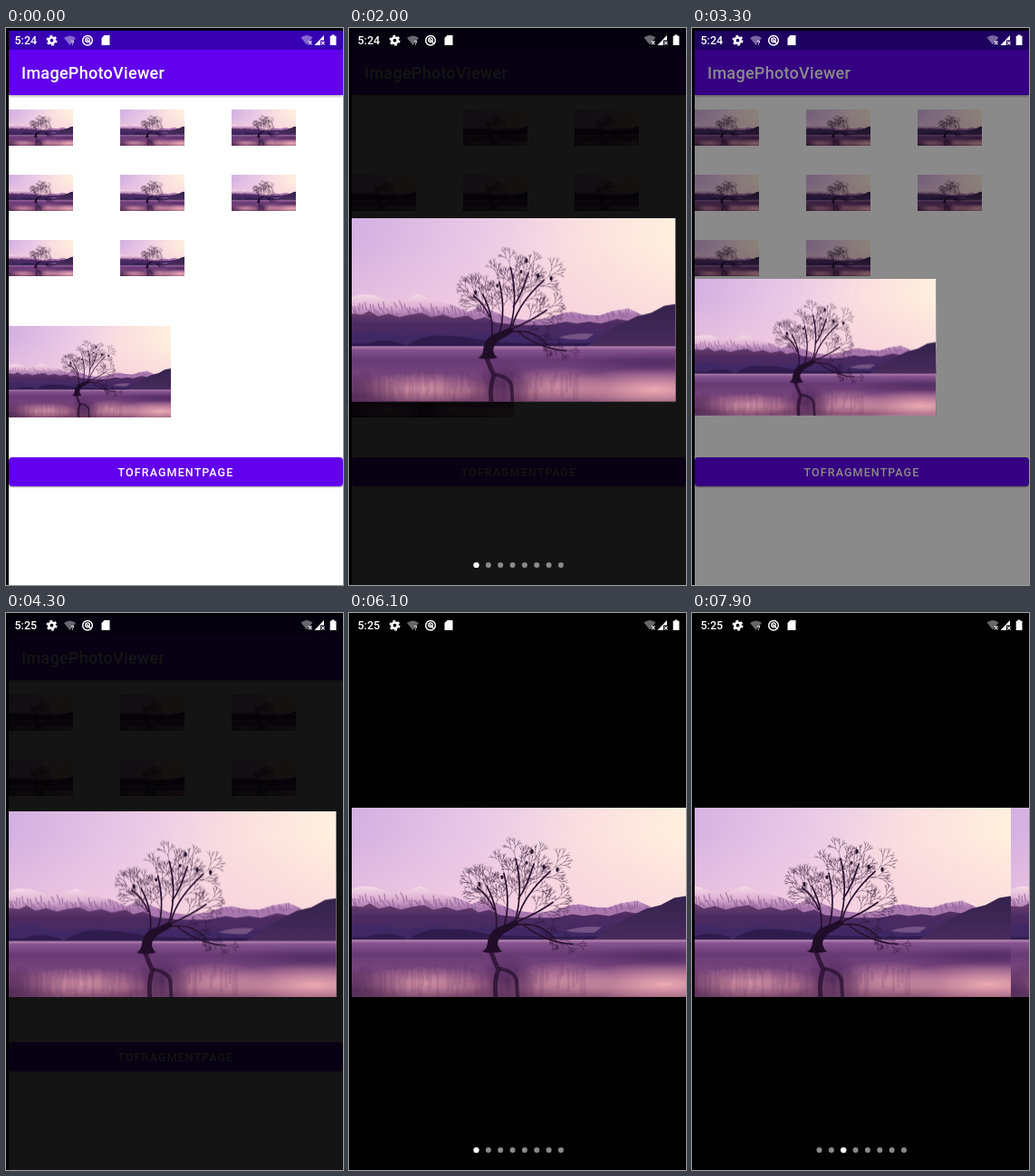
These frames come from a looping animation (372x615 px, 8 s). An HTML page:

```html
<!DOCTYPE html>
<html lang="en">
<head>
<meta charset="utf-8">
<title>Photo viewer</title>
<style>
@property --p { syntax: "<number>"; inherits: true; initial-value: 0; }
@property --dim { syntax: "<number>"; inherits: true; initial-value: 0; }
@property --big { syntax: "<number>"; inherits: true; initial-value: 0; }

html, body { margin: 0; width: 100%; height: 100%; overflow: hidden; background: #000; }
#stage {
  position: relative; width: 372px; height: 615px; overflow: hidden;
  font-family: Roboto, sans-serif; color: #fff;
  animation: open 8s step-end infinite, origin 8s step-end infinite;
}
#stage div, #stage svg { position: absolute; }
#app { left: 3px; top: 3px; right: 0; bottom: 0; background: #fff; overflow: hidden; }
#bar { left: 0; right: 0; top: 0; height: 21px; background: #3700b3; }
#title {
  left: 0; right: 0; top: 21px; height: 50px; padding-left: 14px; box-sizing: border-box;
  background: #6200ee; box-shadow: 0 1px 3px rgba(0,0,0,.4); clip-path: inset(0 0 -6px);
  font: 500 18px/51px Roboto, sans-serif; letter-spacing: .3px;
}
#button {
  left: 0; right: 0; top: 471px; height: 32px; border-radius: 4px;
  background: #6200ee; box-shadow: 0 1px 2px rgba(0,0,0,.4);
  font: 500 12.5px/33px Roboto, sans-serif; letter-spacing: 1.1px; text-align: center;
}
.thumb { width: 71px; height: 40px; }
.thumb.first { opacity: calc(1 - 1000 * var(--p) * (1 - var(--big))); }
#large { left: 0; top: 326px; width: 179px; height: 101px; opacity: calc(1 - 1000 * var(--p) * var(--big)); }
#dim { inset: 0; background: #000; opacity: var(--dim); }
#viewer {
  left: 3px; top: 215px; width: 369px; height: 209px; overflow: hidden;
  transform-origin: 0 0; opacity: calc(1000 * var(--p));
  transform:
    translateY(calc((1 - var(--p)) * (239px * var(--big) - 125px)))
    scale(calc(1 - (1 - var(--p)) * (.807 - .292 * var(--big))));
}
#pages { left: 0; top: 0; width: 738px; height: 209px; animation: swipe 8s step-end infinite; }
#pages svg { width: 369px; height: 209px; top: 0; }
#pages svg + svg { left: 369px; }
#dots { left: 0; top: 0; animation: dots 8s step-end infinite; }
#active { animation: active 8s step-end infinite; }
#status { left: 0; top: 0; }
#status text { font: 500 12.5px Roboto, sans-serif; }
#before { animation: before 8s step-end infinite; }
#after { animation: after 8s step-end infinite; }

@keyframes open {
  0% { --p: 0; --dim: 0; }
  6.25%, 40%, 72.5% { --p: .054; --dim: .054; }
  7.5%, 41.25%, 73.75% { --p: .46; --dim: .46; }
  8.75%, 42.5%, 75% { --p: .92; --dim: .92; }
  10%, 43.75%, 76.25%, 100% { --p: 1; --dim: 1; }
  25%, 53.75% { --p: .962; --dim: .92; }
  26.25%, 55% { --p: .62; --dim: .6; }
  27.5%, 56.25% { --p: .2; --dim: .2; }
  28.75%, 57.5% { --p: .01; --dim: .01; }
  30%, 58.75% { --p: 0; --dim: 0; }
}
@keyframes origin { 0%, 60%, 100% { --big: 0; } 35% { --big: 1; } }
@keyframes swipe {
  0%, 85%, 90% { transform: none; }
  81.25% { transform: translateX(-45px); }
  82.5% { transform: translateX(-215px); }
  83.75% { transform: translateX(-345px); }
  87.5% { transform: translateX(-110px); }
  88.75% { transform: translateX(-330px); }
  95% { transform: translateX(-4px); }
  96.25% { transform: translateX(-9px); }
  97.5% { transform: translateX(-15px); }
  98.75%, 100% { transform: translateX(-20px); }
}
@keyframes dots { 0%, 26.25% { opacity: 0; } 10%, 76.25%, 100% { opacity: 1; } }
@keyframes active {
  0% { transform: none; }
  82.5% { transform: translateX(13.35px); }
  88.75%, 100% { transform: translateX(26.7px); }
}
@keyframes before { 0% { opacity: 1; } 53.75%, 100% { opacity: 0; } }
@keyframes after { 0% { opacity: 0; } 53.75%, 100% { opacity: 1; } }
</style>
</head>
<body>
<svg width="0" height="0" style="position:absolute">
  <defs>
    <linearGradient id="sky" x2="1" y2=".12">
      <stop offset="0" stop-color="#d3b0e1"/><stop offset=".4" stop-color="#e9c9e6"/>
      <stop offset=".7" stop-color="#fae0e0"/><stop offset="1" stop-color="#fff0de"/>
    </linearGradient>
    <linearGradient id="glow" x2="0" y2="1">
      <stop offset=".2" stop-color="#f8cbdd" stop-opacity="0"/><stop offset=".8" stop-color="#f8cbdd" stop-opacity=".6"/>
    </linearGradient>
    <linearGradient id="snow" x2="0" y2="1">
      <stop offset="0" stop-color="#f6dbe8"/><stop offset=".22" stop-color="#dfb3d3"/><stop offset=".4" stop-color="#a977ae"/>
    </linearGradient>
    <linearGradient id="range" x2="0" y2="1">
      <stop offset="0" stop-color="#6b406f"/><stop offset=".35" stop-color="#4c2b61"/><stop offset="1" stop-color="#422864"/>
    </linearGradient>
    <linearGradient id="hill" x2="0" y2="1">
      <stop offset="0" stop-color="#34234c"/><stop offset="1" stop-color="#482b5c"/>
    </linearGradient>
    <linearGradient id="lake" x2="0" y2="1">
      <stop offset="0" stop-color="#bd8bb6"/><stop offset=".06" stop-color="#85548f"/>
      <stop offset=".25" stop-color="#683a74"/><stop offset=".5" stop-color="#76447c"/>
      <stop offset=".8" stop-color="#96597f"/><stop offset="1" stop-color="#764369"/>
    </linearGradient>
    <radialGradient id="pink">
      <stop offset="0" stop-color="#f0adb6" stop-opacity=".95"/><stop offset="1" stop-color="#f0adb6" stop-opacity="0"/>
    </radialGradient>
    <radialGradient id="shade">
      <stop offset="0" stop-color="#35184a" stop-opacity=".8"/><stop offset="1" stop-color="#35184a" stop-opacity="0"/>
    </radialGradient>
    <path id="ridge" d="M0 89L12 86 25 87 36 91 46 94 60 92 75 86 86 90 104 96 118 99 132 106 146 100 158 104 180 113 205 116 225 113 240 107 252 106 265 109 282 110 297 105 315 102 330 109V146H0Z"/>
    <clipPath id="slopes"><use href="#ridge"/></clipPath>
    <symbol id="photo" viewBox="0 0 369 208" preserveAspectRatio="none">
      <rect width="369" height="208" fill="url(#sky)"/>
      <rect width="369" height="146" fill="url(#glow)"/>
      <use href="#ridge" fill="url(#snow)"/>
      <path id="gullies" clip-path="url(#slopes)" fill="none" stroke="#81558f" stroke-width="1.3" opacity=".6"/>
      <path fill="url(#range)" d="M0 108L12 109 20 105 30 111 42 108 54 112 66 109 80 107 90 112 104 109 116 113 132 110 140 115 152 112 164 118 190 121 225 121 244 117 256 119 270 117 284 119 302 114 314 116 330 117V146H0Z"/>
      <path fill="#3f2863" d="M0 131L24 128 54 134 92 131 130 134 160 130 204 134 270 136 300 130V146H0Z"/>
      <path fill="#e0b2cc" opacity=".3" d="M236 135Q255 129 276 131L268 137Q248 138 236 135Z"/>
      <path fill="#2f1c4d" d="M62 145Q76 134 96 133L124 134 160 140 220 142 285 141V146H62ZM0 142L18 142Q38 134 60 143V146H0Z"/>
      <path fill="url(#hill)" d="M267 145Q284 134 302 122L325 111 341 107 356 99 369 97V146H267Z"/>
      <rect y="145" width="369" height="63" fill="url(#lake)"/>
      <ellipse cx="80" cy="192" rx="75" ry="18" fill="url(#pink)" opacity=".7"/>
      <ellipse cx="232" cy="190" rx="60" ry="22" fill="url(#pink)" opacity=".65"/>
      <ellipse cx="345" cy="194" rx="115" ry="25" fill="url(#pink)"/>
      <ellipse cx="345" cy="164" rx="100" ry="13" fill="url(#shade)" opacity=".5"/>
      <ellipse cx="0" cy="200" rx="60" ry="26" fill="url(#shade)" opacity=".8"/>
      <ellipse cx="172" cy="190" rx="34" ry="30" fill="url(#shade)" opacity=".8"/>
      <path id="streaks" stroke="#4a2459" stroke-width="3" opacity=".13"/>
      <g fill="none" stroke="#28102f" stroke-linecap="round">
        <path stroke-width="5" opacity=".8" d="M154 159Q158 170 162 178Q157 190 159 207"/>
        <path stroke-width="4" opacity=".75" d="M164 177Q180 180 182 190L183 207"/>
        <path id="limbs" stroke-width="1.7"/>
        <path id="twigs" stroke-width=".45" opacity=".7"/>
      </g>
      <path fill="#200d28" d="M144 158Q150 155 150 147Q152 137 160 132Q172 128 181 123L185 128Q176 134 168 138Q161 144 161 150Q163 156 166 158Q154 161 144 158Z"/>
      <path stroke="#200d28" stroke-width="3" stroke-linecap="round" d="M199 47v2M212 64v2M227 67v2M193 60v1M166 76v1M141 83v2"/>
    </symbol>
  </defs>
</svg>

<div id="stage">
  <div id="app">
    <div id="title">ImagePhotoViewer</div>
    <div id="bar"></div>
    <div id="grid"></div>
    <svg id="large"><use href="#photo" width="179" height="101"/></svg>
    <div id="button">TOFRAGMENTPAGE</div>
  </div>
  <div id="dim"></div>
  <div id="viewer">
    <div id="pages">
      <svg><use href="#photo" width="369" height="209"/></svg>
      <svg><use href="#photo" width="369" height="209"/></svg>
    </div>
  </div>
  <svg id="dots" width="372" height="615">
    <g id="row" fill="#8a8a8a"></g>
    <circle id="active" cx="140.5" cy="593" r="3.1" fill="#fff"/>
  </svg>
  <svg id="status" width="372" height="28" fill="#fff">
    <text x="9.5" y="18.3" id="before">5:24</text>
    <text x="9.5" y="18.3" id="after">5:25</text>
    <g fill="none" stroke="#fff">
      <circle cx="50.5" cy="13.7" r="3.2" stroke-width="2.6"/>
      <circle cx="50.5" cy="13.7" r="5" stroke-width="2" stroke-dasharray="2.6 2.636"/>
      <circle cx="90" cy="13.7" r="5.3" stroke-width="1.5"/>
      <circle cx="90" cy="13.2" r="2.3" stroke-width="1.3"/>
      <path stroke-width="1.4" d="M89 12.5L94 17.5"/>
    </g>
    <path opacity=".4" d="M64 11Q70.5 6 77 11L70.5 19ZM325.5 10.5Q332 5.500 338.500 10.500L332 18.500Z"/>
    <text x="71.5" y="19" style="font-size:8px">?</text>
    <path d="M108.500 8H114.500V19H105.500V11Z"/>
    <path d="M340.500 19L351 8V13.500H347V19Z"/>
    <path stroke="#fff" stroke-width="1.2" d="M334 14.500l3.500 3.500m0-3.500l-3.500 3.500M348 14.800l3.500 3.500m0-3.500l-3.500 3.500"/>
    <path d="M359.500 7.500H362.500V8.700H364.500V19H357.700V8.700H359.500Z"/>
  </svg>
</div>

<script>
const $ = id => document.getElementById(id);
const times = (n, make) => Array.from({ length: n }, (_, i) => make(i)).join("");
const draw = (id, d) => $(id).setAttribute("d", d);

let seed = 11;
const rand = () => (seed = seed * 16807 % 2147483647) / 2147483647;
const fix = v => v.toFixed(1);

// Tree: main limbs as quadratic curves, each with seeded sprays of twigs.
const limbs = [
  [159, 136, 163, 112, 149, 86],
  [157, 112, 152, 98, 139, 88],
  [168, 131, 176, 105, 168, 72],
  [180, 126, 190, 92, 181, 56],
  [184, 100, 193, 88, 201, 62],
  [183, 122, 190, 96, 219, 70],
  [183, 125, 205, 116, 222, 104],
  [178, 129, 206, 124, 222, 142],
  [190, 129, 214, 148, 244, 150]
];
let twigs = "";

function grow(x, y, angle, len, depth) {
  const x2 = x + Math.cos(angle) * len, y2 = y + Math.sin(angle) * len;
  twigs += `M${fix(x)} ${fix(y)}L${fix(x2)} ${fix(y2)}`;
  if (!depth) return;
  for (const side of [-1, 1])
    grow(x2, y2, angle + side * (.1 + rand() * .45), len * (.65 + rand() * .3), depth - 1);
}

const mix = (a, b, c, t) => (1 - t) ** 2 * a + 2 * t * (1 - t) * b + t * t * c;
for (const [x0, y0, x1, y1, x2, y2] of limbs) {
  const low = y2 > 140;
  [.4, .55, .7, .85, 1].forEach((t, i) => {
    const dx = (1 - t) * (x1 - x0) + t * (x2 - x1), dy = (1 - t) * (y1 - y0) + t * (y2 - y1);
    const turn = t === 1 ? 0 : i % 2 ? .6 : -.6;
    grow(mix(x0, x1, x2, t), mix(y0, y1, y2, t), Math.atan2(dy, dx) + turn, low ? 5 : 7.5, low ? 3 : 4);
  });
}
draw("limbs", limbs.map(l => `M${l[0]} ${l[1]}Q${l.slice(2)}`).join(""));
draw("twigs", twigs);
draw("gullies", times(110, i => `M${i * 3} ${fix(92 + rand() * 16)}l${fix(rand() * 5)} ${fix(5 + rand() * 6)}`));
draw("streaks", times(90, () => `M${fix(rand() * 260)} ${fix(172 + rand() * 12)}v${fix(10 + rand() * 22)}`));

$("grid").innerHTML = times(8, i =>
  `<svg class="thumb${i ? "" : " first"}" style="left:${i % 3 * 123}px;top:${87 + Math.floor(i / 3) * 72}px">` +
  `<use href="#photo" width="71" height="40"/></svg>`);
$("row").innerHTML = times(8, i => `<circle cx="${140.5 + i * 13.35}" cy="593" r="3"/>`);
</script>
</body>
</html>
```
